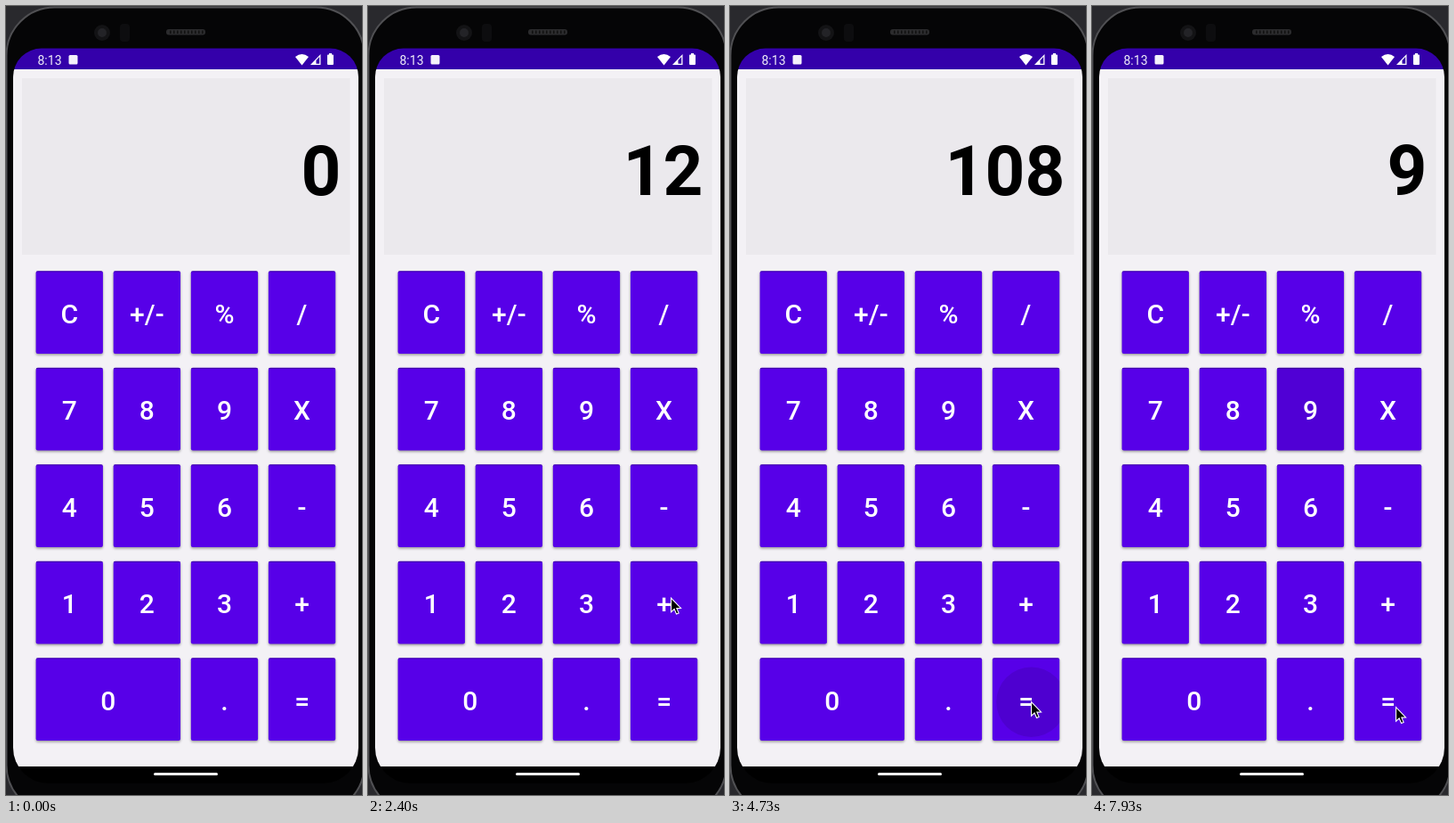
An HTML page with a canvas for the animation above (8 s loop, 400x885 px).

```html
<!DOCTYPE html>
<html lang="en">
<head>
<meta charset="utf-8">
<title>Calculator</title>
<style>
  html, body { margin: 0; width: 100%; height: 100%; overflow: hidden; background: #29292d; }
  canvas { display: block; }
</style>
</head>
<body>
<canvas id="stage" width="400" height="885"></canvas>
<script>
const ctx = document.getElementById('stage').getContext('2d');
const LOOP = 8000, TRAVEL = 400, RIPPLE_HOLD = 500, RIPPLE_FADE = 350;
const KEY_W = 75.3, KEY_H = 92.8, PITCH_X = 87.1, PITCH_Y = 108.5;
const PURPLE = '#5700e8', STATUS = '#3400aa';

const keys = ['C ± % /', '7 8 9 X', '4 5 6 -', '1 2 3 +', '0 _ . ='].flatMap((row, r) =>
  row.split(' ').map((label, c) => ({
    label: label === '±' ? '+/-' : label,
    x: 33.6 + PITCH_X * c,
    y: 297.3 + PITCH_Y * r,
    w: label === '0' ? KEY_W + PITCH_X : KEY_W
  }))).filter(key => key.label !== '_');

// The pointer reaches a key, slightly off its centre; with a tap time it also presses it.
const visits = [
  { key: '1', at: 1000, tap: 1140, dx: 20, dy: -10 },
  { key: '2', at: 1400, tap: 1540, dx: 10, dy: -9 },
  { key: '+', at: 2300, dx: 8, dy: -5 },
  { key: 'X', at: 2820, tap: 2920, dx: 6, dy: 3 },
  { key: '9', at: 3540, tap: 3660, dx: -3, dy: 4 },
  { key: '=', at: 4450, tap: 4600, dx: 6, dy: 3 },
  { key: '-', at: 5530, tap: 6320, dx: 2, dy: -36 },
  { key: '9', at: 6800, tap: 7300, dx: 14, dy: 23 },
  { key: '=', at: 7800, dx: 9, dy: 9 }
].map(visit => {
  const key = keys.find(k => k.label === visit.key);
  return { ...visit, x: key.x + key.w / 2 + visit.dx, y: key.y + KEY_H / 2 + visit.dy };
});
const taps = visits.filter(visit => visit.tap);

const clamp = v => Math.max(0, Math.min(1, v));
const ease = v => v * v * (3 - 2 * v);
const mix = (a, b, k) => a + (b - a) * k;

// Runs the calculator over all keys pressed so far.
function displayAt(t) {
  let shown = '0', stored = 0, operator = null, fresh = true;
  const apply = { '+': (a, b) => a + b, '-': (a, b) => a - b, 'X': (a, b) => a * b };
  for (const { key, tap } of taps) {
    if (tap > t) break;
    if (key >= '0' && key <= '9') {
      shown = fresh ? key : shown + key;
      fresh = false;
    } else {
      if (operator) shown = String(apply[operator](stored, +shown));
      stored = +shown;
      operator = key === '=' ? null : key;
      fresh = true;
    }
  }
  return shown;
}

function rounded(x, y, w, h, radius, fill) {
  ctx.beginPath();
  ctx.roundRect(x, y, w, h, radius);
  ctx.fillStyle = fill;
  ctx.fill();
}

function polygon(points, fill) {
  ctx.beginPath();
  points.forEach(([x, y]) => ctx.lineTo(x, y));
  ctx.closePath();
  ctx.fillStyle = fill;
  ctx.fill();
}

function disc(x, y, r, fill) {
  ctx.beginPath();
  ctx.arc(x, y, r, 0, 7);
  ctx.fillStyle = fill;
  ctx.fill();
}

function text(value, x, y, font, color, align) {
  ctx.font = font + ' Roboto, sans-serif';
  ctx.fillStyle = color;
  ctx.textAlign = align;
  ctx.fillText(value, x, y);
}

function drawPhone() {
  ctx.fillStyle = '#29292d';
  ctx.fillRect(0, 0, 400, 885);
  rounded(0.5, 1.5, 402, 904, 54, '#050506');
  ctx.lineWidth = 2;
  ctx.strokeStyle = '#505053';
  ctx.stroke();

  disc(108, 30, 9, '#131315');
  disc(108, 30, 5, '#232327');
  rounded(128, 20, 11, 20, 4, '#0d0d0f');
  rounded(180, 26, 44, 6.5, 3, '#2b2b2d');
  ctx.fillStyle = '#111';
  for (let x = 184; x < 221; x += 4) ctx.fillRect(x, 27.5, 1.5, 3.5);
}

function drawStatusBar() {
  ctx.fillStyle = STATUS;
  ctx.fillRect(8, 47, 388, 24);
  text('8:13', 35.5, 65.5, '14px', '#f0edf8', 'left');
  rounded(70.5, 55, 10, 10.5, 1.5, '#f4f1fb');

  ctx.beginPath();
  ctx.moveTo(332.5, 66.5);
  ctx.lineTo(325, 57);
  ctx.quadraticCurveTo(332.5, 51, 340, 57);
  ctx.fillStyle = '#fff';
  ctx.fill();

  polygon([[342, 66], [353.5, 66], [353.5, 54]], '#fff');
  polygon([[348.5, 61], [352.2, 57], [352.2, 64.8], [348.5, 64.8]], STATUS);
  rounded(361, 54.5, 7, 11.5, 1, '#fff');
  ctx.fillRect(363, 53, 3, 2);
}

function drawKey(key, t) {
  const ripples = taps.filter(p => p.key === key.label && t >= p.tap);
  const lifted = ripples.some(p => t < p.tap + 120);
  ctx.save();
  ctx.shadowColor = 'rgba(0,0,0,.38)';
  ctx.shadowBlur = lifted ? 7 : 3;
  ctx.shadowOffsetY = lifted ? 4 : 1.5;
  rounded(key.x, key.y, key.w, KEY_H, 2, PURPLE);
  ctx.restore();

  ctx.save();
  ctx.clip();
  ctx.fillStyle = 'rgba(30,0,90,.55)';
  ctx.fillRect(key.x, key.y, key.w, 1);
  for (const { tap, x, y } of ripples) {
    const age = t - tap;
    const strength = clamp(age / 160) * (1 - clamp((age - RIPPLE_HOLD) / RIPPLE_FADE));
    disc(x, y, 0.3 * age, `rgba(0,0,0,${0.13 * strength})`);
  }
  ctx.restore();
  text(key.label, key.x + key.w / 2, key.y + 58.2, '500 30px', '#fff', 'center');
}

function drawScreen(t) {
  ctx.save();
  rounded(8, 47.5, 388, 824.5, [32, 32, 40, 40], '#000');
  ctx.clip();
  ctx.fillStyle = '#f3f1f5';
  ctx.fillRect(8, 71, 388, 782);
  drawStatusBar();
  ctx.fillStyle = '#ebe9ed';
  ctx.fillRect(18, 81, 368.5, 198);
  text(displayAt(t), 376.3, 211.5, 'bold 78.3px', '#000', 'right');
  keys.forEach(key => drawKey(key, t));
  rounded(166, 860, 72, 3, 1.5, '#f2f2f2');
  ctx.restore();
}

function drawPointer(t) {
  let x = 404, y = 700;
  if (t < visits[0].at - TRAVEL) return;
  for (const visit of visits) {
    const k = ease(clamp((t - visit.at) / TRAVEL + 1));
    x = mix(x, visit.x, k);
    y = mix(y, visit.y, k);
  }
  ctx.save();
  ctx.translate(x, y);
  polygon([[0, 0], [0, 15.5], [3.6, 12.3], [6, 17.8], [8.6, 16.7], [6.3, 11.4], [11, 11.2]], '#000');
  ctx.lineWidth = 1.1;
  ctx.strokeStyle = '#fff';
  ctx.stroke();
  ctx.restore();
}

const start = performance.now();
function tick() {
  const t = (performance.now() - start) % LOOP;
  drawPhone();
  drawScreen(t);
  drawPointer(t);
  requestAnimationFrame(tick);
}
tick();
</script>
</body>
</html>
```
